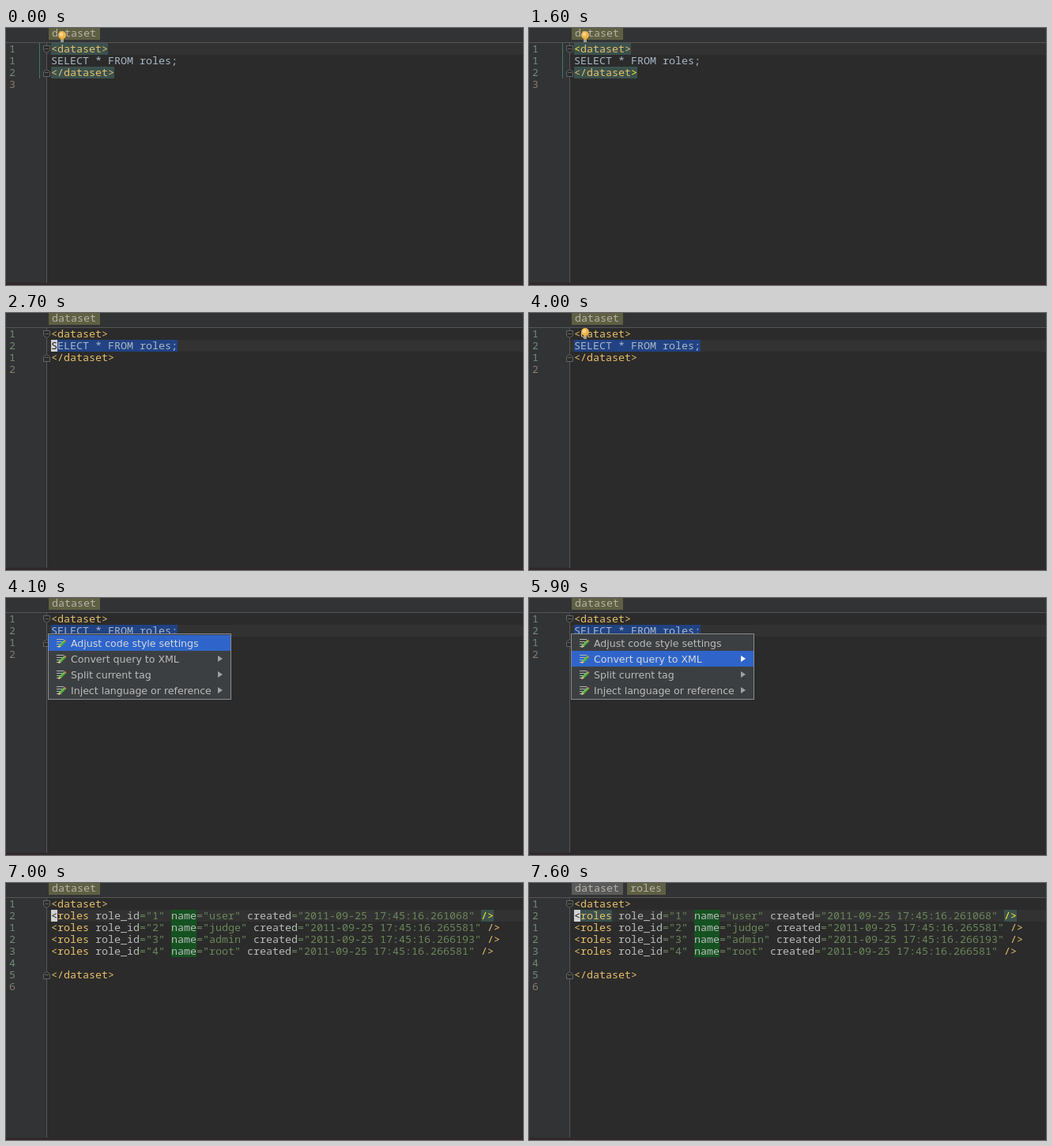
Animation, 654 px wide and 326 px high, one loop 8000 ms. Source, as an HTML page:

```html
<!DOCTYPE html>
<html lang="en">
<head>
<meta charset="utf-8">
<title>Convert query to XML</title>
<style>
html, body { margin: 0; width: 100%; height: 100%; overflow: hidden; background: #2b2b2b; }
svg { display: block; width: 100vw; height: 100vh; }
text { white-space: pre; font: 13.3333px "Noto Sans Mono", "DejaVu Sans Mono", monospace; }
.menu { font: 12.55px "DejaVu Sans", Verdana, sans-serif; }
</style>
</head>
<body>
<svg id="stage" viewBox="0 0 654 326" preserveAspectRatio="none"></svg>
<script>
const LOOP = 8000, CHAR = 8, LEFT = 57, ROW = 15, TOP = 19;
const C = {
  text: '#a9b7c6', tag: '#e8bf6a', attr: '#bababa', value: '#6a8759',
  match: '#3b514d', brace: '#ffef28', found: '#155221', sel: '#214283'
};
const stage = document.getElementById('stage');

const esc = s => s.replace(/&/g, '&amp;').replace(/</g, '&lt;');
const rect = (x, y, w, h, fill) =>
  `<rect x="${x}" y="${y}" width="${w}" height="${h}" fill="${fill}"/>`;
const text = (x, y, s, fill, extra = '') =>
  `<text x="${x}" y="${y}" fill="${fill}" ${extra}>${esc(s)}</text>`;
const path = (d, fill, stroke = 'none', extra = '') =>
  `<path d="${d}" fill="${fill}" stroke="${stroke}" ${extra}/>`;

const rowY = row => TOP + row * ROW;
const code = (row, col, s, fill, extra) =>
  text(LEFT + col * CHAR, rowY(row) + 12, s, fill, extra);
const mark = (row, col, n, fill) =>
  rect(LEFT + col * CHAR, rowY(row), n * CHAR, ROW, fill);
const brace = (row, col, s) => code(row, col, s, C.brace, 'font-weight="700"');
const caret = (row, ch) => mark(row, 0, 1, '#d2d2d2') + code(row, 0, ch, '#202020');

function frame(caretRow) {
  return rect(0, 0, 654, 326, '#2b2b2b') +
    rect(0, 0, 654, 18, '#313335') +
    rect(0, 19, 51, 307, '#313335') +
    rect(52, rowY(caretRow), 602, ROW, '#323232') +
    rect(51, 19, 1, 307, '#555555') +
    rect(0, 18, 654, 1, '#555555') +
    rect(0, 323, 654, 3, '#30282a');
}

function crumb(x, s, fill) {
  return rect(x, 0, s.length * CHAR + 9, 15, fill) + text(x + 4, 11, s, '#b5b3a6');
}

function numbers(list) {
  return [...list].map((n, i) =>
    text(4, rowY(i) + 12, n, i === list.length - 1 ? '#887c70' : '#728a74')).join('');
}

function fold(row, up) {
  const y = rowY(row) + 8, k = up ? -1 : 1;
  return path(`M47.5 ${y - 4.5 * k}h8v${6 * k}l-4 ${3 * k}l-4 ${-3 * k}z`, '#2b2b2b', '#646464') +
    rect(49, y - 1, 5, 1, '#646464');
}

function bulb(y) {
  return `<circle cx="71" cy="${y + 5}" r="5" fill="#efb44c"/>` +
    `<circle cx="70" cy="${y + 4}" r="2.4" fill="#f8d58a"/>` +
    rect(69, y + 9, 4, 2, '#d9a548') + rect(69, y + 11, 4, 3, '#9a9a9a');
}

function pencil(x, y) {
  let s = '';
  for (let i = 0; i < 4; i++) s += rect(x, y + i * 3, 9 - i, 1, '#b4b4b4');
  return s + path(`M${x + 4} ${y + 9}l7 -7`, 'none', '#4fa83d', 'stroke-width="3.4"') +
    path(`M${x + 4} ${y + 8}l6 -6`, 'none', '#8ed468', 'stroke-width="1"') +
    path(`M${x + 2} ${y + 11}l1 -3.4l2.4 2.4z`, '#e8cf9a') +
    path(`M${x + 9.8} ${y + 1}l2.2 2.2`, 'none', '#d96a5b', 'stroke-width="1.4"');
}

function menu(active) {
  const items = ['Adjust code style settings', 'Convert query to XML',
    'Split current tag', 'Inject language or reference'];
  let s = rect(53, 45, 232, 84, '#8a8c8d') + rect(54, 46, 230, 82, '#3c3f41');
  items.forEach((label, i) => {
    const y = 47 + i * 20, on = i === active;
    if (on) s += rect(54, y, 230, 20, '#2f65ca');
    s += pencil(64, y + 5) + text(82, y + 15, label, on ? '#d4d8de' : '#bbbbbb', 'class="menu"');
    if (i) s += path(`M268 ${y + 6}l6 4l-6 4z`, on ? '#ffffff' : '#a0a0a0');
  });
  return s;
}

function entry(row, id, name, time, first, matched) {
  const nameCol = 19, madeCol = nameCol + 8 + name.length, q = '"';
  const stamp = q + '2011-09-25 17:45:16.' + time + q;
  const end = madeCol + 9 + stamp.length;
  let s = mark(row, nameCol, 4, C.found);
  if (matched) s += mark(row, 1, 5, C.match);
  if (first) s += mark(row, end, 2, C.match);
  return s + code(row, 0, '<roles', C.tag) +
    code(row, 7, 'role_id', C.attr) + code(row, 14, `="${id}"`, C.value) +
    code(row, nameCol, 'name', C.attr) + code(row, nameCol + 4, `="${name}"`, C.value) +
    code(row, madeCol, 'created', C.attr) + code(row, madeCol + 7, '=' + stamp, C.value) +
    (first ? brace(row, end, '/>') : code(row, end, '/>', C.tag));
}

function query(t) {
  const row = t < 1900 ? 0 : 1, tagged = t < 2400, selected = t >= 2700;
  const bold = t >= 100 && tagged;
  let s = frame(row) + crumb(54, 'dataset', '#5f5f43') + numbers(row ? '1212' : '1123');
  if (t < 100 || (t >= 600 && t < 1900)) s += rect(42, 19, 1, 45, '#3f7a66');
  if (tagged) s += mark(0, 0, 9, C.match) + mark(2, 0, 10, C.match);
  if (selected) s += mark(1, 0, 20, C.sel);
  s += fold(0, false) + fold(2, true) +
    code(0, bold ? 1 : 0, bold ? 'dataset>' : '<dataset>', C.tag) +
    code(1, 0, 'SELECT * FROM roles;', C.text) +
    code(2, 0, bold ? '</dataset' : '</dataset>', C.tag);
  if (bold) s += brace(0, 0, '<') + brace(2, 9, '>');
  if (t >= 100 && t < 1600) s += caret(0, '<');
  if (t >= 1900 && t < 4000) s += caret(1, 'S');
  if (t < 2000) s += bulb(4);
  if (t >= 4000 && t < 4100) s += bulb(19);
  if (t >= 4100 && t < 6800) s += menu(t < 5900 ? 0 : 1);
  return s;
}

function result(t) {
  const rows = [['user', '261068'], ['judge', '265581'], ['admin', '266193'], ['root', '266581']];
  const inside = t >= 7300;
  return frame(1) + crumb(54, 'dataset', inside ? '#5a5a5a' : '#5f5f43') +
    (inside ? crumb(124, 'roles', '#5f5f43') : '') +
    numbers('12123456') + fold(0, false) + fold(6, true) +
    code(0, 0, '<dataset>', C.tag) +
    rows.map(([name, time], i) =>
      entry(i + 1, i + 1, name, time, i === 0, i === 0 && t >= 7600)).join('') +
    code(6, 0, '</dataset>', C.tag) + caret(1, '<');
}

let shown = '';
function draw(t) {
  const s = t < 7000 ? query(t) : result(t);
  if (s !== shown) stage.innerHTML = shown = s;
}

const start = performance.now();
function tick() {
  draw((performance.now() - start) % LOOP);
  requestAnimationFrame(tick);
}
tick();
</script>
</body>
</html>
```
